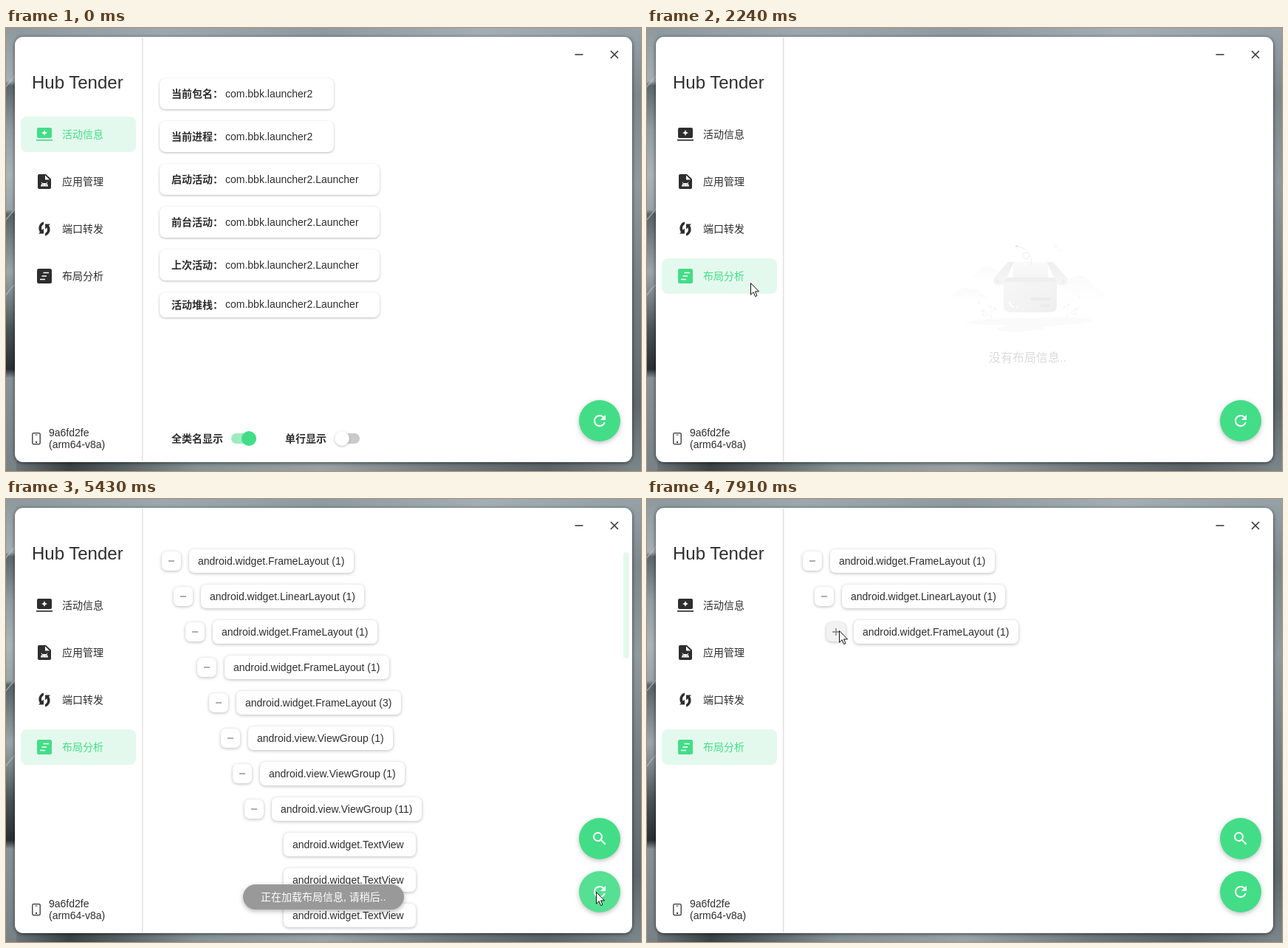
An HTML page for the animation above (8 s loop, 860 by 600 pixels).

```html
<!DOCTYPE html>
<html lang="zh-CN">
<head>
<meta charset="utf-8">
<title>Hub Tender</title>
<style>
html, body { margin: 0; width: 100%; height: 100%; overflow: hidden; background: #8f9a9f; }
svg { display: block; }
text { font: 14px "Liberation Sans", Arial, "Noto Sans CJK SC", "Noto Sans CJK", sans-serif; fill: #2e2e2e; white-space: pre; }
.b { font-weight: bold; }
.card { fill: #fff; filter: drop-shadow(0 1px 1.5px rgba(0,0,0,.27)); }
.pill { fill: #fff; filter: drop-shadow(.5px 1px 2px rgba(0,0,0,.27)); }
.fab { fill: #43dd87; filter: drop-shadow(0 2px 3px rgba(0,0,0,.25)); }
.nav { color: #2e2e2e; }
.nav text { fill: currentColor; }
.ripple { transform-box: fill-box; transform-origin: center; }
</style>
</head>
<body>
<script>
const LOOP = 8000;
let css = '', animId = 0;

// Each key is [ms, value, easing to the next key]; returns a style attribute.
function anim(prop, ...keys) {
  const name = 'k' + animId++;
  if (keys[0][0] > 0) keys.unshift([0, keys[0][1]]);
  keys.push([LOOP, keys[keys.length - 1][1]]);
  css += `@keyframes ${name}{` + keys.map(([ms, v, ease = 'linear']) =>
    `${ms / LOOP * 100}%{${prop}:${v};animation-timing-function:${ease}}`).join('') + '}';
  return `${name} ${LOOP}ms infinite`;
}
const style = (...list) => `style="animation:${list.join(',')}"`;
const fade = (...keys) => style(anim('opacity', ...keys));
const HOLD = 'step-end';

const rect = (x, y, w, h, r, attr = '') =>
  `<rect x="${x}" y="${y}" width="${w}" height="${h}" rx="${r}" ${attr}/>`;
const text = (x, y, s, attr = '') => `<text x="${x}" y="${y}" ${attr}>${s}</text>`;
const circle = (x, y, r, attr = '') => `<circle cx="${x}" cy="${y}" r="${r}" ${attr}/>`;
const path = (d, attr = '') => `<path d="${d}" ${attr}/>`;
const line = (d, color, w = 1.5, attr = '') =>
  path(d, `fill="none" stroke="${color}" stroke-width="${w}" ${attr}`);
const group = (attr, ...kids) => `<g ${attr}>${kids.join('')}</g>`;
const at = (x, y, ...kids) => group(`transform="translate(${x} ${y})"`, ...kids);

const gradient = (id, dir, ...stops) => `<linearGradient id="${id}" ${dir}>` +
  stops.map(([o, c]) => `<stop offset="${o}" stop-color="${c}"/>`).join('') + '</linearGradient>';
const DOWN = 'x1="0" y1="0" x2="0" y2="1"';
const DIAG = 'x1="0" y1="0" x2="1" y2="1"';

const defs = '<defs>' +
  gradient('top', '', [0, '#8c989d'], [.25, '#9ca8ae'], [.5, '#8e9a9f'], [.75, '#a3aeb4'], [1, '#939fa5']) +
  gradient('left', DOWN, [0, '#8e999e'], [.12, '#a5afb3'], [.13, '#5d676b'], [.23, '#929da1'],
    [.33, '#aab3b6'], [.41, '#9aa4a8'], [.42, '#596165'], [.55, '#9ca6aa'], [.6, '#7e888c'],
    [.68, '#4a5256'], [.77, '#282e31'], [.79, '#879196'], [1, '#778186']) +
  gradient('right', DOWN, [0, '#97a2a8'], [.15, '#7d888d'], [.35, '#8f9a9f'], [.6, '#727d82'],
    [.85, '#5f696d'], [1, '#7b868b']) +
  gradient('bottom', '', [0, '#737d82'], [.1, '#3a4245'], [.17, '#535d61'], [.3, '#869196'],
    [.5, '#98a2a7'], [.7, '#6d777c'], [.85, '#5a6367'], [1, '#7c868b']) +
  gradient('front', DIAG, [0, '#dedede'], [1, '#bababa']) +
  gradient('inner', DOWN, [0, '#ededed'], [1, '#cfcfcf']) +
  gradient('flap', DOWN, [0, '#b8b8b8'], [1, '#dadada']) +
  gradient('cloud', DOWN, [0, '#ececec'], [1, '#ffffff']) +
  '</defs>';

const backdrop =
  rect(0, 0, 860, 600, 0, 'fill="#8f9a9f"') +
  rect(0, 0, 860, 14, 0, 'fill="url(#top)"') +
  rect(0, 586, 860, 14, 0, 'fill="url(#bottom)"') +
  rect(0, 0, 14, 600, 0, 'fill="url(#left)"') +
  rect(846, 0, 14, 600, 0, 'fill="url(#right)"') +
  line('M-2 82 L14 62 M-2 262 L14 243 M0 362 Q6 352 14 346', '#c3cacd', 1.5, 'opacity=".6"') +
  rect(12, 12, 836, 576, 11, 'fill="#fff" style="filter:drop-shadow(0 1px 2.5px rgba(0,0,0,.6))"') +
  rect(184, 13, 1.5, 574, 0, 'fill="#e2e2e2"');

const sparkle = (x, y, r, fill) => path(
  `M${x} ${y - r}l${r * .3} ${r * .7} ${r * .7} ${r * .3} ${-r * .7} ${r * .3} ${-r * .3} ${r * .7} ` +
  `${-r * .3} ${-r * .7} ${-r * .7} ${-r * .3} ${r * .7} ${-r * .3}z`, `fill="${fill}"`);

const FILL = 'fill="currentColor"';
const arrow = path('M11 2.5 C5 4 2.5 11 6 16.5 L4 18.5 H11 V11.5 L8.7 13.8 C7.3 10.5 8 8 11 5.8Z', FILL);
const icons = [
  rect(2, 3, 20, 14, 2, FILL) + rect(1, 19, 22, 1.7, 0, FILL) + sparkle(12, 10, 4, '#fff'),
  path('M5 2H14L21 8.5V20a2 2 0 0 1-2 2H5a2 2 0 0 1-2-2V4a2 2 0 0 1 2-2Z', FILL) +
    path('M13 3.5V9.5H19Z', 'fill="#fff"') +
    path('M7 18.5a5 4.6 0 0 1 10 0Z', 'fill="#fff"') +
    line('M8 12.8l1.5 2.2M16 12.8l-1.5 2.2', '#fff', 1) +
    circle(10, 16.6, .6, FILL) + circle(14, 16.6, .6, FILL),
  arrow + group('transform="rotate(180 12 12)"', arrow),
  rect(2, 2, 20, 20, 2.5, FILL) + line('M10.5 7.5H18M8.5 12H15M6 16.5H13', '#fff', 1.7)
];

const GREEN = '#43dd87', DARK = '#2e2e2e';
const navStyles = {
  0: [style(anim('fill', [0, '#e4f9ee'], [1960, '#e4f9ee'], [2200, '#ffffff'])),
      style(anim('color', [0, GREEN], [1960, GREEN], [2200, DARK]))],
  3: [style(anim('fill', [0, '#ffffff'], [1690, '#ffffff'], [1820, '#f4f4f4'], [1960, '#f4f4f4'], [2200, '#e4f9ee'])),
      style(anim('color', [0, DARK], [1960, DARK], [2200, GREEN]))]
};
const nav = ['活动信息', '应用管理', '端口转发', '布局分析'].map((label, i) => {
  const y = 120 + 64 * i, [bg, ink] = navStyles[i] || ['fill="#fff"', ''];
  return rect(20, y, 156, 48, 8, bg) +
    group(`class="nav" ${ink}`, at(40, y + 12, icons[i]), text(76, y + 29, label));
}).join('');

const chrome =
  text(35, 82, 'Hub Tender', 'style="font-size:24px"') + nav +
  rect(35.8, 548.7, 10.4, 15, 1.6, 'fill="none" stroke="#333" stroke-width="1.3"') +
  rect(39.5, 550.6, 3, 1, 0, 'fill="#333"') + rect(40, 560, 2, 2, 0, 'fill="#333"') +
  text(58, 553, '9a6fd2fe') + text(58, 569, '(arm64-v8a)') +
  line('M770.5 36H781.5M819 31L829 41M829 31L819 41', '#333', 1.5);

const APP = 'com.bbk.launcher2', MAIN = APP + '.Launcher';
const info = [['当前包名', APP], ['当前进程', APP], ['启动活动', MAIN],
  ['前台活动', MAIN], ['上次活动', MAIN], ['活动堆栈', MAIN]];
const infoPage = group(fade([2000, 1], [2190, 0]),
  ...info.map(([label, value], i) => {
    const y = 68 + 58 * i, h = i === 5 ? 34 : 42, base = y + h / 2 + 5;
    return rect(208, y, value === APP ? 236 : 298, h, 8, 'class="card"') +
      text(224, base, label + '：', 'class="b"') + text(297, base - (i === 5), value);
  }),
  text(224, 561, '全类名显示', 'class="b"'),
  rect(305, 549, 34, 14, 7, 'fill="#9cecbf"'), circle(329, 556, 10, `fill="${GREEN}"`),
  text(378, 561, '单行显示', 'class="b"'),
  rect(445, 549, 34, 14, 7, 'fill="#cacaca"'), circle(455, 556, 10, 'class="card"'));

const plant = line('M0 0Q-4-8-12-11M0 0Q0-9-2-17M-4-6l-7 1M-1-9l5-5', '#dcdcdc', 1) +
  ['-12 -11', '-11 -5', '-2 -17', '4 -14'].map(p =>
    `<ellipse rx="3" ry="1.7" transform="translate(${p}) rotate(35)" fill="#e4e4e4"/>`).join('');
const flap = path('M489 317H497L483 347Q476 351 470 346Q467 342 470 338Z', 'fill="url(#flap)"') +
  circle(475, 343, 5.5, 'fill="#d2d2d2"') + circle(475, 343, 2.5, 'fill="#b5b5b5"');
const emptyPage = group(fade([0, 0], [2190, 0], [2420, 1], [5424, 1, HOLD], [5425, 0]),
  path('M434 340Q443 332 449 328Q458 319 468 325Q476 327 480 340Z', 'fill="url(#cloud)"'),
  path('M408 371Q414 361 420 358Q428 348 439 353Q449 351 454 360Q464 362 468 371Z', 'fill="url(#cloud)"'),
  path('M556 371Q565 340 580 336Q596 332 604 350Q618 353 622 371Z', 'fill="url(#cloud)"'),
  path('M429 399Q470 391 520 393Q575 390 604 395Q590 402 535 404Q545 409 507 411Q480 413 473 407Q482 404 490 403Q450 403 429 399Z', 'fill="#ebebeb"'),
  at(467, 394, plant), at(569, 392, group('transform="scale(-1 1)"', plant)),
  rect(496, 317, 47, 24, 2, 'fill="url(#inner)"'),
  flap, group('transform="translate(1038.5 0) scale(-1 1)"', flap),
  path('M483 338H555V377Q555 385 547 385H491Q483 385 483 377Z', 'fill="url(#front)"'),
  path('M487 338H551L555 344H483Z', 'fill="#b9b9b9"'),
  rect(520, 365, 27, 4, 1, 'fill="#a3a3a3"'), rect(533, 374, 13, 4, 1, 'fill="#a9a9a9"'),
  line('M491 370Q491 377 497 378', '#fff', 2), circle(501, 378, 1, 'fill="#fff"'),
  line('M501 296Q513 297 517 305Q519 312 513 313Q508 311 509 306Q514 301 519 309Q523 316 519 322', '#b0b0b0', 1),
  circle(500.5, 295.5, 1.8, 'fill="#a0a0a0"'),
  sparkle(553, 296, 4, '#e2e2e2'), sparkle(558, 301, 2.5, '#e8e8e8'),
  circle(449, 372, 2, 'fill="#e2e2e2"'), circle(453, 362, 2, 'fill="#e6e6e6"'),
  circle(585, 364, 1.8, 'fill="#e8e8e8"'),
  text(463, 452, '没有布局信息..', 'style="font-size:16px;fill:#606060"'));

const W = 'android.widget.', V = 'android.view.ViewGroup';
const tree = [[W + 'FrameLayout (1)', 223], [W + 'LinearLayout (1)', 221], [W + 'FrameLayout (1)', 223],
  [W + 'FrameLayout (1)', 223], [W + 'FrameLayout (3)', 223], [V + ' (1)', 196], [V + ' (1)', 196],
  [V + ' (11)', 203], ...Array(3).fill([W + 'TextView', 179])];
const row = ([label, w], i) => {
  const x = 16 * Math.min(i, 8), y = 48 * i;
  const hover = i === 2
    ? style(anim('fill', [7080, '#ffffff'], [7160, '#f4f4f4'], [7250, '#e9e9e9'], [7630, '#e9e9e9'], [7900, '#f2f2f2'])) : '';
  const toggle = i > 7 ? '' : rect(211 + x, 71 + y, 26, 26, 7, `class="pill" ${hover}`) +
    line(`M${220 + x} ${84 + y}h8`, '#8c8c8c', 1.4);
  const plus = i === 2 ? line('M251 180h10M256 175v10', '#8c8c8c', 1.6, fade([0, 0, HOLD], [7220, 1])) : '';
  return toggle + plus + rect(248 + x, 68 + y, w, 32, 7, 'class="pill"') + text(260 + x, 89 + y, label);
};
const rows = tree.map(row);
const treePage = group(fade([0, 0, HOLD], [5425, 1]),
  ...rows.slice(0, 3),
  group(fade([7210, 1], [7430, 0]), ...rows.slice(3), rect(836, 72, 8, 144, 4, 'fill="#e4f9ee"')));

const refresh = 'M17.65 6.35A7.96 7.96 0 0 0 12 4a8 8 0 1 0 7.73 10h-2.08A6 6 0 1 1 12 6c1.66 0 3.14.69 4.22 1.78L13 11h7V4z';
const search = 'M15.5 14h-.79l-.28-.27A6.47 6.47 0 0 0 16 9.5 6.5 6.5 0 1 0 9.5 16c1.61 0 3.09-.59 4.23-1.57l.27.28v.79l5 4.99L20.49 19zm-6 0a4.5 4.5 0 1 1 0-9 4.5 4.5 0 0 1 0 9z';
const white = 'fill="#fff"';
const fabs =
  group(fade([0, 0, HOLD], [5425, 1]), circle(804, 460, 28, 'class="fab"'), at(792, 448, path(search, white))) +
  // the refresh button only exists once per page, so it stays put throughout
  circle(804, 532, 28, 'class="fab"') +
  circle(804, 532, 28, `${white} ` + fade([0, 0], [3040, 0], [3180, .1], [5650, .1], [5800, 0])) +
  circle(804, 532, 28, `${white} class="ripple" ` + style(
    anim('transform', [0, 'scale(0)'], [3400, 'scale(0)', 'ease-out'], [3640, 'scale(1)']),
    anim('opacity', [0, .25], [3600, .25], [3860, 0]))) +
  at(792, 520, path(refresh, white));

const toast = group(fade([0, 0], [3480, 0], [3720, 1], [5720, 1], [5960, 0]),
  rect(321, 522, 218, 34, 17, 'fill="#999" style="filter:drop-shadow(0 2px 3px rgba(0,0,0,.3))"'),
  text(345, 544, '正在加载布局信息, 请稍后..', 'style="fill:#fff"'));

const move = (ms, x, y, ease) => [ms, `translate(${x}px,${y}px)`, ease];
const cursor = group(style(
    anim('opacity', [0, 0, HOLD], [606, 1]),
    anim('transform',
      move(0, 669, 570), move(606, 669, 570, 'cubic-bezier(.35,.2,.3,1)'),
      move(1370, 140, 345), move(2260, 140, 345, 'cubic-bezier(.5,0,.8,.7)'),
      move(2500, 357, 394, 'cubic-bezier(.2,.5,.4,1)'),
      move(3330, 799, 533), move(4284, 799, 533, HOLD), move(4285, 799, 532),
      move(5540, 799, 532, 'cubic-bezier(.5,0,.75,.7)'),
      move(6190, 514, 374, 'cubic-bezier(.2,.45,.5,.95)'),
      move(6680, 273, 202, 'ease-out'), move(6960, 263, 188),
      move(7090, 263, 188), move(7200, 263, 185), move(7620, 263, 185, 'ease-out'), move(7900, 260, 178))),
  path('M.5 .5V16.2L4.1 12.7 6.6 18.6 9 17.6 6.5 11.9H11.5Z', 'fill="#fff" stroke="#111" stroke-width="1"'));

const art = defs + backdrop + chrome + infoPage + emptyPage + treePage + fabs + toast + cursor;
document.head.insertAdjacentHTML('beforeend', `<style>${css}</style>`);
document.body.innerHTML = `<svg width="860" height="600" viewBox="0 0 860 600">${art}</svg>`;
</script>
</body>
</html>
```
